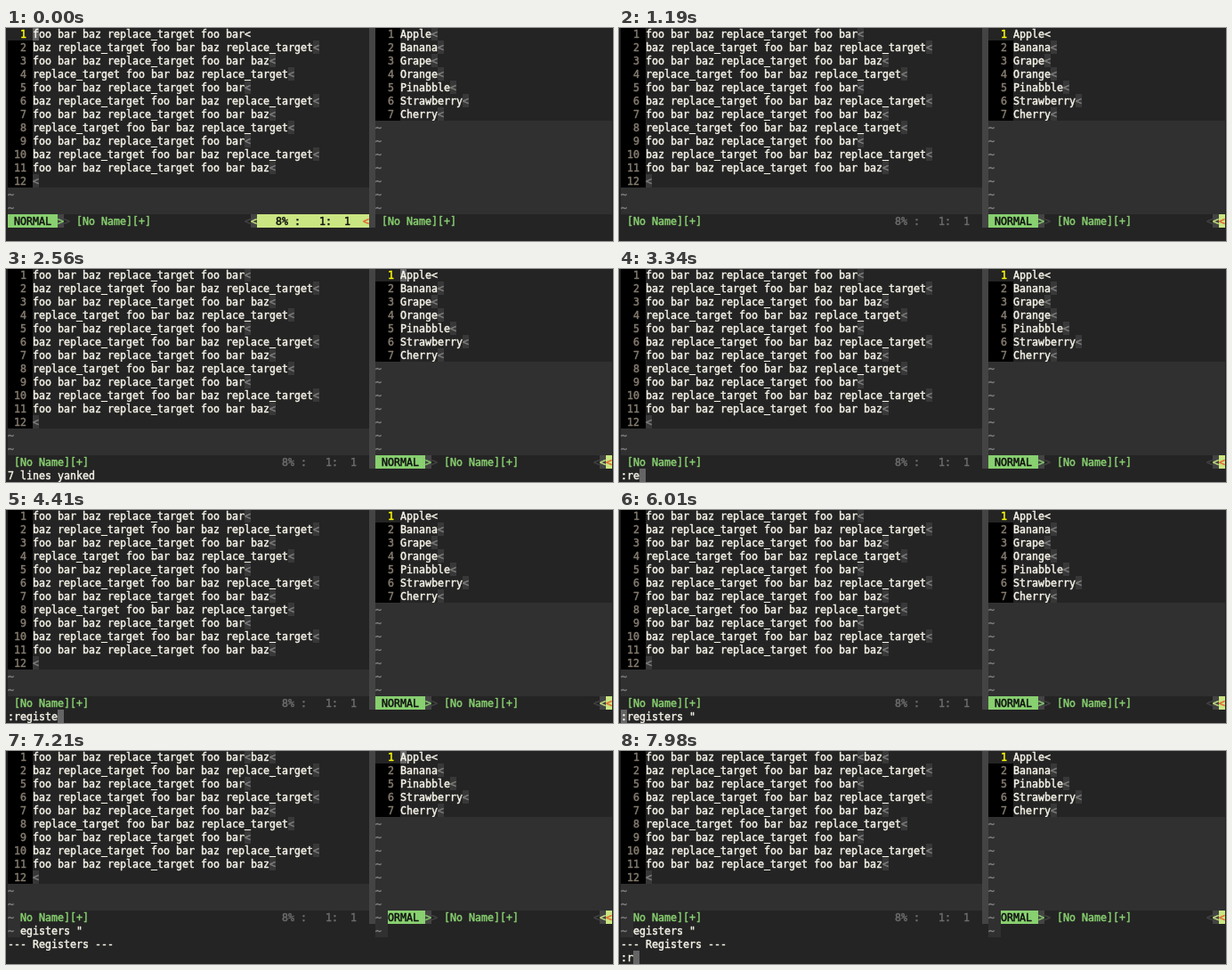
These frames come from a looping animation (682x239 px, 8 s). An HTML page with a canvas:

```html
<!DOCTYPE html>
<html lang="en">
<head>
<meta charset="utf-8">
<title>Vim registers</title>
<style>
html, body { margin: 0; width: 100%; height: 100%; overflow: hidden; background: #242424; }
canvas { display: block; }
</style>
</head>
<body>
<canvas id="screen" width="682" height="239"></canvas>
<script>
const LOOP = 8000, CELL_W = 7, CELL_H = 15, LEFT = 2, TOP = -1, BASELINE = 12;
const BG = '#242424', FG = '#f6f3e8', DIM = '#808080', EMPTY = '#303030', EOL = '#383838',
      GREY = '#444444', CURSOR = '#656565', LINE_NR = '#857b6f', YELLOW = '#ffff00',
      GREEN = '#88d070', BLUE = '#8ac6f2', LIME = '#cae682', RED = '#e8602c', INFO = '#6c6c6c';

const phrases = [
  'foo bar baz replace_target foo bar',
  'baz replace_target foo bar baz replace_target',
  'foo bar baz replace_target foo bar baz',
  'replace_target foo bar baz replace_target'
];
const lines = Array.from({ length: 12 }, (_, i) => i < 11 ? phrases[i % 4] : '');
const fruits = ['Apple', 'Banana', 'Grape', 'Orange', 'Pinabble', 'Strawberry', 'Cherry'];
const leftWin = { col: 0, width: 58, text: lines, info: '   8% :   1:  1  ' };
const rightWin = { col: 59, width: 38, text: fruits, info: '' };

const command = ':registers "';
const keyTimes = [2980, 3280, 3340, 4000, 4080, 4170, 4350, 4410, 4590, 4760, 5060, 5230];

const ctx = document.getElementById('screen').getContext('2d');
ctx.font = '11.627px "DejaVu Sans Mono", monospace';
ctx.lineWidth = 0.45;
ctx.lineJoin = 'round';

// Writes text into the character grid; the thin stroke gives it a medium weight.
function put(row, col, text, fg = FG, bg = BG) {
  const x = LEFT + col * CELL_W, y = TOP + row * CELL_H;
  ctx.fillStyle = bg;
  ctx.fillRect(x, y, text.length * CELL_W, CELL_H);
  ctx.fillStyle = ctx.strokeStyle = fg;
  [...text].forEach((ch, i) => {
    ctx.fillText(ch, x + i * CELL_W, y + BASELINE);
    ctx.strokeText(ch, x + i * CELL_W, y + BASELINE);
  });
}

function drawLine(win, index, row, current, selected) {
  const text = win.text[index], plain = current || selected;
  const bg = selected ? GREY : BG;
  const number = String(index + 1).padStart(3) + ' ';
  put(row, win.col, number, current ? YELLOW : LINE_NR, current ? BG : '#000');
  put(row, win.col + 4, text, FG, bg);
  put(row, win.col + 4 + text.length, '<', plain ? FG : DIM, plain ? bg : EOL);
}

function drawStatus(win, row, mode) {
  const name = '[No Name][+]', end = win.col + win.width;
  put(row, win.col, ' '.repeat(win.width));
  if (!mode) {
    put(row, win.col + 1, name, GREEN);
    put(row, end - win.info.length, win.info.trimEnd(), INFO);
    return;
  }
  const visual = mode === 'V-LINE', color = visual ? BLUE : GREEN, side = visual ? BLUE : LIME;
  const infoCol = end - 1 - win.info.length;
  put(row, win.col, ` ${mode} `, '#101010', color);
  put(row, win.col + 8, '>', color, GREY);
  put(row, win.col + 9, '>', GREY);
  put(row, win.col + 11, name, color);
  put(row, infoCol - 2, '<', GREY);
  put(row, infoCol - 1, '<', side, GREY);
  put(row, infoCol, win.info, '#101010', side);
  put(row, end - 1, '<', RED, side);
}

function drawWindow(win, shift, mode, current, selected) {
  for (let i = 0; i < 14; i++) {
    if (i < win.text.length) drawLine(win, i, i + shift, i === current, i < selected);
    else put(i + shift, win.col, '~'.padEnd(win.width), DIM, EMPTY);
  }
  drawStatus(win, 14 + shift, mode);
}

function drawRegisters() {
  put(13, 0, command);
  put(14, 0, '--- Registers ---');
  put(15, 0, '""');
  let col = 5;
  for (const fruit of fruits) {
    put(15, col, fruit);
    put(15, col + fruit.length, '^J', DIM, '#343434');
    col += fruit.length + 2;
  }
}

// Only the first two lines and a few cells are repainted over the scrolled screen.
function drawPartialRedraw() {
  for (const win of [leftWin, rightWin]) {
    for (const i of [0, 1]) drawLine(win, i, i, win === rightWin && i === 0, false);
    for (const row of [12, 13]) put(row, win.col, '~ ', DIM, EMPTY);
  }
  put(15, 0, ' '.repeat(97));
}

function draw(t) {
  const onLeft = t < 530, visual = t >= 1490 && t < 2500;
  const selected = !visual ? 0 : t < 1670 ? 1 : 7;
  const current = selected ? selected - 1 : 0;
  const shift = t < 6070 ? 0 : -2;
  const cursor = (row, col, ch = ' ') => put(row, col, ch, FG, CURSOR);

  ctx.fillStyle = BG;
  ctx.fillRect(0, 0, 682, 239);
  for (let row = 0; row < 15 + shift; row++) put(row, 58, ' ', FG, GREY);
  drawWindow(leftWin, shift, onLeft ? 'NORMAL' : '', onLeft ? 0 : -1, 0);
  drawWindow(rightWin, shift, onLeft ? '' : visual ? 'V-LINE' : 'NORMAL', onLeft ? -1 : current, selected);

  if (t < 2980) {
    const hidden = (t >= 1190 && t < 1490) || (t >= 2390 && t < 2500);
    if (onLeft) cursor(0, 4, 'f');
    else if (!hidden) cursor(current, 63, fruits[current][0]);
    if (t >= 2560) put(15, 0, '7 lines yanked');
  } else if (t < 6070) {
    const typed = keyTimes.filter(time => t >= time).length;
    put(15, 0, command.slice(0, typed));
    if (t < 5950) cursor(15, typed);
    else if (t >= 6010) cursor(15, 0, ':');
  } else {
    drawRegisters();
    if (t >= 7210) drawPartialRedraw();
    if (t >= 7510) {
      const typed = t < 7980 ? ':' : ':r';
      put(15, 0, typed);
      cursor(15, typed.length);
    } else if (t >= 7210) cursor(0, 63, 'A');
  }
}

function tick() {
  draw(performance.now() % LOOP);
  requestAnimationFrame(tick);
}
tick();
</script>
</body>
</html>
```
